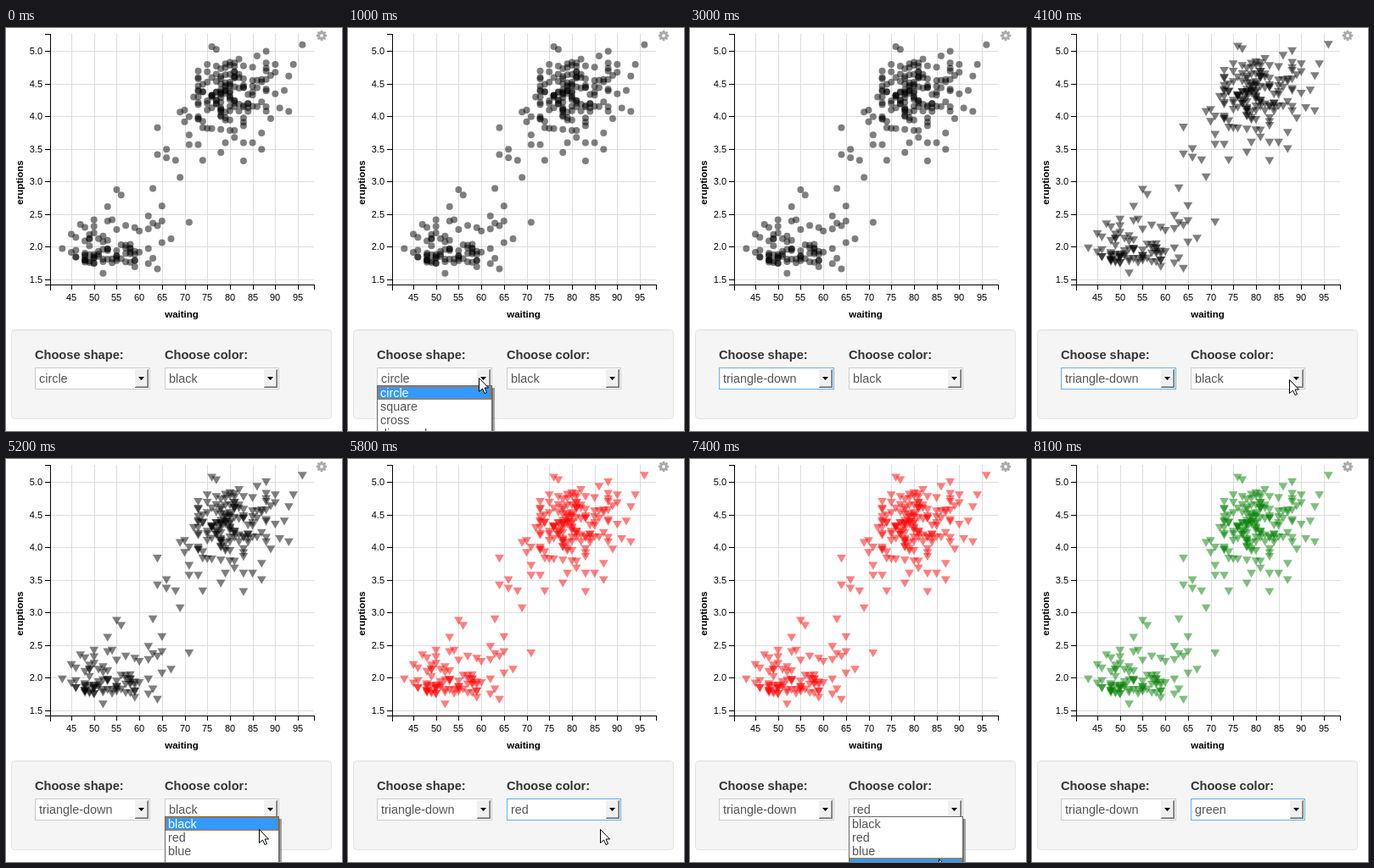
An HTML page with a canvas that plays this animation: 396x476 px, repeating every 9100 ms.

```html
<!DOCTYPE html>
<html lang="en">
<head>
<meta charset="utf-8">
<title>Scatter plot controls</title>
<style>
  html, body { margin: 0; width: 100%; height: 100%; overflow: hidden; background: #fff; }
  canvas { display: block; }
</style>
</head>
<body>
<canvas id="stage" width="396" height="476"></canvas>
<script>
const ctx = document.getElementById('stage').getContext('2d');
const LOOP = 9100, STEP = 100;
const FONT = '"Liberation Sans", Arial, sans-serif';
const SHAPES = ['circle', 'square', 'cross', 'diamond', 'triangle-up', 'triangle-down'];
const COLORS = ['black', 'red', 'blue', 'green'];

// Pointer path: time, x, y
const PATH = [
  [0, 194, 479], [600, 154, 413], [1400, 154, 413], [1900, 145, 510],
  [3300, 195, 482], [4100, 303, 415], [4300, 312, 409], [4500, 312, 409],
  [5200, 298, 437], [5300, 294, 441], [5700, 294, 441], [6400, 313, 410],
  [6600, 313, 410], [7400, 293, 472], [7700, 293, 472], [8100, 290, 500], [LOOP, 290, 500]
];

// Outlying points: waiting, eruptions
const EDGE = [
  43, 1.98, 45, 2.2, 45, 1.92, 46, 2.15, 47, 2.35, 50, 2.42, 50, 2.32, 50, 2.22,
  52, 1.6, 52, 2.17, 53, 2.62, 53, 2.4, 54, 2.42, 55, 2.88, 55, 2.27, 56, 2.8,
  59, 2.3, 60, 2.25, 59, 1.7, 62, 2.28, 62, 2.48, 62, 1.98, 62, 1.75, 63, 1.83,
  63, 2.37, 63, 2.9, 64, 1.67, 64, 2.33, 64, 3.83, 64, 3.42, 65, 2.63, 65, 2.4,
  65, 2.07, 67, 2.13, 66, 3.37, 66, 3.5, 68, 3.33, 69, 3.07, 69, 4.07, 70, 4.1,
  70, 3.92, 71, 4, 71, 3.72, 71, 3.57, 71, 2.38, 72, 4.3, 73, 3.57, 73, 4.7,
  74, 3.33, 74, 3.83, 75, 4.8, 76, 5.07, 77, 5.03, 78, 3.45, 79, 3.6, 81, 3.68,
  83, 3.32, 83, 3.6, 85, 3.6, 87, 3.5, 86, 4.93, 88, 5, 88, 4.7, 88, 4.15,
  89, 3.97, 90, 4.8, 90, 4.68, 90, 4.35, 91, 4.13, 92, 4.4, 93, 4.62, 93, 4.08,
  94, 4.8, 96, 5.1
];

const px = w => 77 + (w - 45) * 5.34;
const py = e => 27.5 + (5 - e) * 77.14;

let seed = 272;
const rand = () => (seed = (seed * 1664525 + 1013904223) % 4294967296) / 4294967296;
const bell = () => (rand() + rand() + rand() + rand() - 2) * 1.73;
const clamp = (v, lo, hi) => Math.min(hi, Math.max(lo, v));

const points = [];
const add = (w, e) => points.push([px(w), py(e)]);
for (let i = 0; i < EDGE.length; i += 2) add(EDGE[i], EDGE[i + 1]);
for (let i = 0; i < 63; i++)
  add(Math.round(46 + rand() * 14), 1.75 + Math.abs(bell()) * 0.2);
for (let i = 0; i < 135; i++) {
  const w = clamp(Math.round(80 + bell() * 4), 73, 89);
  add(w, clamp(4.36 + (w - 80) * 0.01 + bell() * 0.27, 3.75, 4.88));
}

function box(x, y, w, h, fill) {
  ctx.fillStyle = fill;
  ctx.fillRect(x, y, w, h);
}

function frame(x, y, w, h, stroke) {
  ctx.strokeStyle = stroke;
  ctx.lineWidth = 1;
  ctx.strokeRect(x + 0.5, y + 0.5, w - 1, h - 1);
}

function text(str, x, y, size, color, align = 'left', weight = '') {
  ctx.font = `${weight} ${size}px ${FONT}`;
  ctx.textAlign = align;
  ctx.fillStyle = color;
  ctx.fillText(str, x, y);
}

function poly(pts, fill, stroke) {
  ctx.beginPath();
  pts.forEach(([x, y]) => ctx.lineTo(x, y));
  ctx.closePath();
  ctx.fillStyle = fill;
  ctx.fill();
  if (stroke) {
    ctx.strokeStyle = stroke;
    ctx.lineWidth = 1;
    ctx.stroke();
  }
}

function drawAxes() {
  for (let w = 45; w <= 95; w += 5) {
    const x = Math.round(px(w));
    box(x, 7, 1, 296, '#ddd');
    box(x, 303, 1, 6, '#000');
    text(w, x, 322, 11, '#000', 'center');
  }
  for (let e = 1.5; e <= 5; e += 0.5) {
    const y = Math.floor(py(e));
    box(52, y, 311, 1, '#ddd');
    box(46, y, 6, 1, '#000');
    text(e.toFixed(1), 43, y + 4, 11, '#000', 'right');
  }
}

function drawDomain() {
  box(52, 7, 1, 303, '#000');
  box(46, 303, 318, 1, '#000');
  box(46, 7, 6, 1, '#000');
  box(363, 303, 1, 6, '#000');
  text('waiting', 207, 342, 11.5, '#000', 'center', 'bold');
  ctx.save();
  ctx.translate(20, 182.5);
  ctx.rotate(-Math.PI / 2);
  text('eruptions', 0, 0, 11.5, '#000', 'center', 'bold');
  ctx.restore();
}

function drawMarks(round, color) {
  ctx.globalAlpha = 0.5;
  for (const [x, y] of points) {
    if (round) {
      ctx.beginPath();
      ctx.arc(x, y, 4, 0, 7);
      ctx.fillStyle = color;
      ctx.fill();
    } else {
      poly([[x, y + 4.65], [x + 5.37, y - 4.65], [x - 5.37, y - 4.65]], color);
    }
  }
  ctx.globalAlpha = 1;
}

function drawGear() {
  ctx.save();
  ctx.translate(372, 9);
  for (let i = 0; i < 8; i++) {
    box(-1.4, -6.2, 2.8, 3, '#aaa');
    ctx.rotate(Math.PI / 4);
  }
  ctx.beginPath();
  ctx.arc(0, 0, 3.3, 0, 7);
  ctx.strokeStyle = '#aaa';
  ctx.lineWidth = 2.8;
  ctx.stroke();
  ctx.restore();
}

function drawPanel() {
  ctx.beginPath();
  ctx.roundRect(6.5, 356.5, 377, 105, 4);
  ctx.fillStyle = '#f5f5f5';
  ctx.fill();
  ctx.strokeStyle = '#e3e3e3';
  ctx.lineWidth = 1;
  ctx.stroke();
  box(9, 357, 372, 1, '#ededed');
  text('Choose shape:', 34, 391, 14.6, '#333', 'left', 'bold');
  text('Choose color:', 187, 391, 14.6, '#333', 'left', 'bold');
}

function drawSelect(x, w, value, focused) {
  box(x, 401, w, 26, '#fff');
  frame(x, 401, w, 26, focused ? '#66afe9' : '#ccc');
  text(value, x + 5, 419, 14.4, '#555');
  const b = x + w - 18;
  box(b, 403, 16, 22, '#f0f0f0');
  box(b, 424, 16, 1, '#696969');
  box(b + 15, 403, 1, 22, '#696969');
  box(b + 1, 423, 14, 1, '#a0a0a0');
  box(b + 14, 404, 1, 20, '#a0a0a0');
  poly([[b + 4, 412], [b + 11, 412], [b + 7.5, 416]], '#000');
}

function drawList(x, w, items, active) {
  box(x + w, 425, 3, 60, 'rgba(0,0,0,.35)');
  box(x + w, 425, 1, 60, 'rgba(0,0,0,.25)');
  box(x, 422, w, 80, '#fff');
  frame(x, 422, w, 80, '#666');
  items.forEach((item, i) => {
    const y = 423 + 16 * i;
    if (i === active) {
      box(x + 1, y, w - 2, 16, '#39f');
      frame(x + 1, y, w - 2, 16, '#c87020');
    }
    text(item, x + 4, y + 13, 14.4, i === active ? '#fff' : '#555');
  });
}

function pointerAt(t) {
  const i = PATH.findIndex(k => k[0] > t);
  const [t0, x0, y0] = PATH[i - 1], [t1, x1, y1] = PATH[i];
  const p = (t - t0) / (t1 - t0);
  return [Math.round(x0 + (x1 - x0) * p), Math.round(y0 + (y1 - y0) * p)];
}

function drawPointer(x, y) {
  const outline = [[0, 0], [0, 16], [4, 12.5], [6.5, 18], [9, 17], [6.5, 11.5], [11, 11.5]];
  poly(outline.map(([a, b]) => [x + a + 0.5, y + b + 0.5]), '#fff', '#000');
}

function draw(t) {
  const within = (a, b) => t >= a && t < b;
  const [mx, my] = pointerAt(t);
  const shape = t < 3000 ? 0 : 5;
  const color = t < 5700 ? 0 : t < 7800 ? 1 : 3;
  const shapeOpen = within(1000, 3000);
  const colorOpen = within(4500, 5700) || within(6700, 7800);
  const hover = (chosen, count) =>
    my < 423 ? chosen : Math.min(count - 1, Math.floor((my - 423) / 16));

  box(0, 0, 396, 476, '#fff');
  drawAxes();
  drawMarks(t < 3100, t < 5800 ? 'black' : t < 7900 ? 'red' : 'green');
  drawDomain();
  drawGear();
  drawPanel();
  drawSelect(34, 136, SHAPES[shape], within(900, 4400) && !shapeOpen);
  drawSelect(187, 135, COLORS[color], t >= 4400 && !colorOpen);
  // The pointer stays past the last row while the shape list waits
  if (shapeOpen) drawList(34, 136, SHAPES, t >= 1900 ? 5 : hover(shape, 6));
  if (colorOpen) drawList(187, 135, COLORS, hover(color, 4));
  drawPointer(mx, my);
}

const start = performance.now();
function tick() {
  const t = (performance.now() - start) % LOOP;
  draw(Math.floor(t / STEP) * STEP);
  requestAnimationFrame(tick);
}
tick();
</script>
</body>
</html>
```
